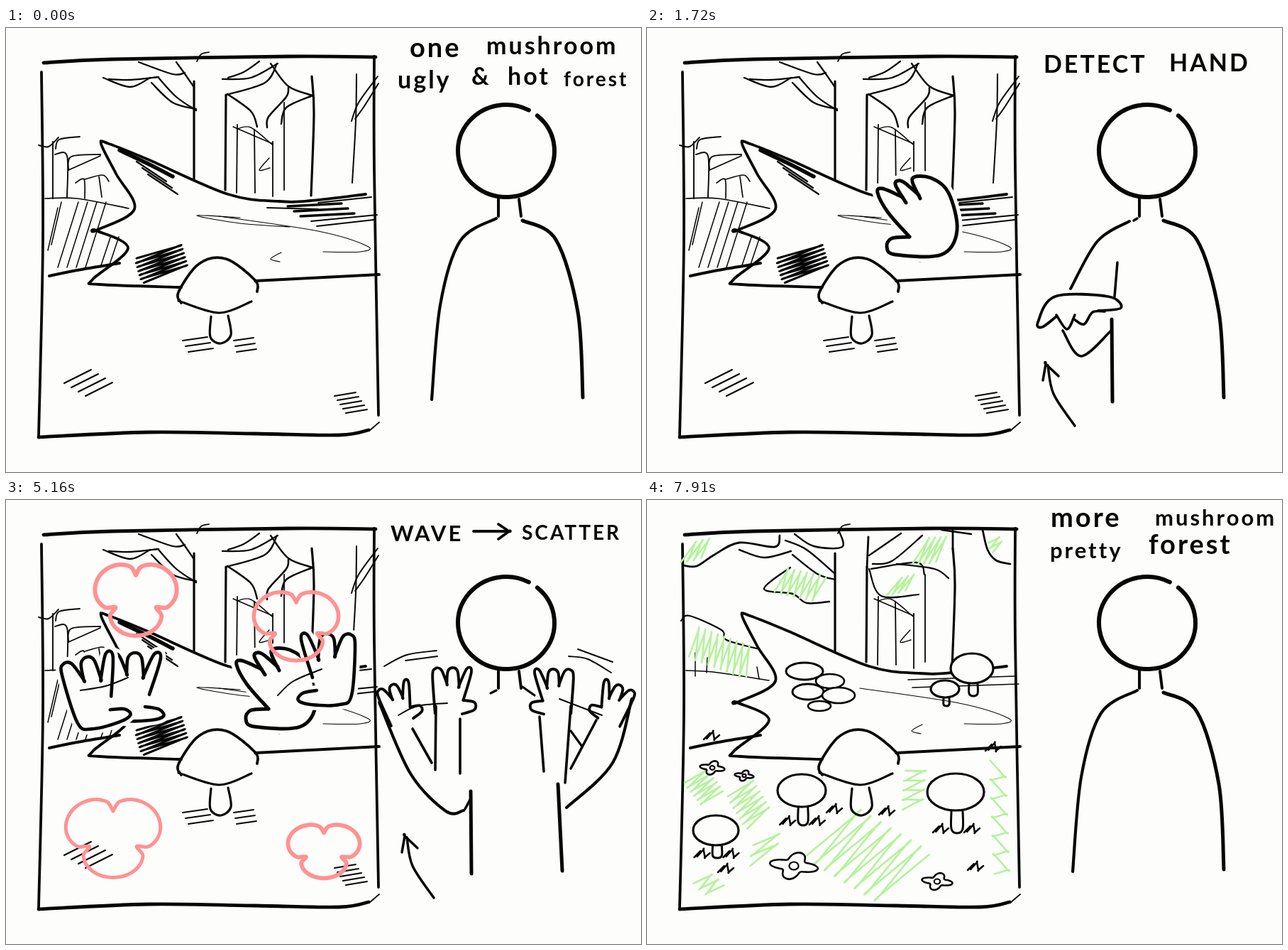
Recreate the animation shown at these times as an HTML page with a canvas. Size 895 by 625 pixels, loop 8.6 s.

```html
<!DOCTYPE html>
<html lang="en">
<head>
<meta charset="utf-8">
<title>Mushroom storyboard</title>
<style>
html, body { margin: 0; width: 100%; height: 100%; overflow: hidden; background: #fdfdfc; }
canvas { display: block; }
</style>
</head>
<body>
<canvas width="895" height="625" role="img" aria-label="Hand-drawn storyboard of a mushroom forest"></canvas>
<script>
const PAPER = '#fdfdfc', INK = '#060606', PINK = '#ff9292', GREEN = '#b5f29c';
const HOLD = 1720;
const canvas = document.querySelector('canvas');
const g = canvas.getContext('2d');
g.lineCap = g.lineJoin = 'round';

// Maps local points to a place, scale and tilt on the stage.
function at(x, y, sx = 1, sy = sx, deg = 0) {
  const a = deg * Math.PI / 180, c = Math.cos(a), s = Math.sin(a);
  return (u, v) => [x + u * sx * c - v * sy * s, y + u * sx * s + v * sy * c];
}

// Smooth curve through the points; a repeated point makes a corner.
function curve(text, place = at(0, 0)) {
  const n = text.trim().split(/\s+/).map(Number), p = [];
  for (let i = 0; i < n.length; i += 2) p.push(place(n[i], n[i + 1]));
  const path = new Path2D();
  path.moveTo(...p[0]);
  for (let i = 0; i < p.length - 1; i++) {
    const b = p[i], c = p[i + 1], a = p[i - 1] || b, d = p[i + 2] || c;
    path.bezierCurveTo(b[0] + (c[0] - a[0]) / 6, b[1] + (c[1] - a[1]) / 6,
      c[0] - (d[0] - b[0]) / 6, c[1] - (d[1] - b[1]) / 6, ...c);
  }
  return path;
}

// Strokes are separated by "/".
function ink(width, strokes, place, hue = INK) {
  g.strokeStyle = hue;
  g.lineWidth = width;
  for (const s of strokes.split('/')) g.stroke(curve(s, place));
}

// Covers what lies behind, with a thin margin, before inking.
function solid(width, strokes, place) {
  const shape = curve(strokes.replaceAll('/', ' '), place);
  g.fillStyle = g.strokeStyle = PAPER;
  g.lineWidth = width + 10;
  g.fill(shape);
  g.stroke(shape);
  ink(width, strokes, place);
}

function hatch(width, x, y, dx, dy, stepX, stepY, n) {
  for (let i = 0; i < n; i++) ink(width, `0 0 ${dx} ${dy}`, at(x + i * stepX, y + i * stepY));
}

function zigzag(x, y, dx, dy, ox, oy, n, width = 2.6, hue = GREEN) {
  let s = '';
  for (let i = 0; i <= n; i++) {
    const side = i % 2 ? 1 : -1;
    s += ` ${i / n * dx + side * ox} ${i / n * dy + side * oy}`.repeat(2);
  }
  ink(width, s, at(x, y), hue);
}

function oval(x, y, rx, ry, width) {
  g.beginPath();
  g.ellipse(x, y, rx, ry, 0, 0, 7);
  g.fillStyle = PAPER;
  g.fill();
  g.strokeStyle = INK;
  g.lineWidth = width;
  g.stroke();
}

// Radial outline; radius(a) runs over one turn from the top.
function blob(width, x, y, rx, ry, radius, hue) {
  let s = '';
  for (let i = 0; i <= 48; i++) {
    const a = i * Math.PI / 24, r = radius(a);
    s += ` ${r * Math.sin(a)} ${-r * Math.cos(a)}`;
  }
  ink(width, s, at(x, y, rx, ry), hue);
}

const cloud = (width, x, y, rx, ry) =>
  blob(width, x, y, rx, ry, a => 0.58 + 0.48 * Math.sqrt(Math.abs(Math.sin(1.5 * a))), PINK);

function write(text, x, y, size = 34) {
  g.font = `bold ${size}px Lato, sans-serif`;
  g.letterSpacing = '3px';
  g.fillStyle = INK;
  g.fillText(text, x, y);
}

function frame() {
  ink(4.8, '53 49 150 44 400 40 521 41/46 576 200 569 350 571 470 573 511 566');
  ink(3.8, '50 62 52 300 46 575/519 40 519 200 525 545');
  ink(1.8, '512 567 526 555/269 47 275 37 286 34');
}

function log() {
  ink(3.8, '507 234 430 243 385 244 313 234 200 185 145 163 134 163 155 205 181 255 127 285 127 285 172 310 122 354 132 361 247 365');
  ink(4, '61 349 100 341 160 331/351 356 526 347');
  ink(1.1, '300 265 440 286 509 307 500 315 447 315/388 316 373 325 386 329');
}

function mushroom() {
  ink(3.8, '247 387 243 372 272 332 310 325 351 355 354 371');
  ink(3.2, '243 384 300 401 346 385/289 406 288 435 303 444 317 432 313 405');
}

function trunks() {
  ink(3.2, '265 75 265 213/310 94 309 228/431 68 434 120 430 236');
  ink(1.8, '326 136 325 232/350 143 351 232/376 160 376 237/392 105 392 228');
  ink(1.4, '320 139 376 163/326 142 345 140 375 164/371 183 357 200 372 197');
}

function bareWoods() {
  trunks();
  ink(2.3, '137 70 175 83 203 70/145 72 175 73 215 69/215 70 240 97 268 116/205 77 235 105 268 114');
  ink(2.3, '187 48 235 65 252 63/240 48 253 66 264 82/313 70 335 62 357 47/305 72 345 70 383 50/311 94 365 77 382 50');
  ink(2.5, '312 93 345 117 354 139/373 50 398 82 432 95/398 84 395 97 370 125 368 140/432 95 395 112 388 135');
  ink(2, '494 65 493 130 488 218/524 68 497 105 487 131/525 78 505 110 492 128');
  ink(1.9, '46 165 60 167 74 154/66 160 66 240/70 170 75 157 104 153/69 178 86 180 86 238/88 200 92 181 133 178/88 200 133 180');
  ink(1.7, '98 218 110 213 111 240/111 213 136 207 145 216/131 209 135 238/55 240 100 240 173 254');
  hatch(1.5, 78, 245, -14, 60, -5, 8, 2);
  hatch(1.5, 102, 245, -29, 92, 13, 0, 4);
  hatch(1.5, 148, 292, -14, 42, 11, 2, 2);
}

function shading() {
  ink(5.5, '160 172 200 191 235 209');
  hatch(2.2, 184, 188, 42, 28, 8, 9, 3);
  zigzag(214, 314, 10, 34, 26, -9, 12, 3, INK);
  hatch(3.3, 397, 251, 76, -4, 9, 7, 3);
  ink(1.8, '368 253 440 255/440 246 515 238/430 272 523 263/438 279 518 270');
  ink(1.2, '330 267 269 264 330 275 400 280');
  hatch(1.8, 249, 440, 35, -5, 4, 8, 3);
  hatch(1.8, 321, 440, 28, -4, 2, 8, 3);
  hatch(2.1, 82, 500, 38, -19, 10, 6, 4);
  hatch(2.1, 463, 518, 30, -5, 4, 6, 5);
}

function head() {
  g.beginPath();
  g.ellipse(705, 173, 68, 65, 0, -0.87, 5.2);
  g.strokeStyle = INK;
  g.lineWidth = 6;
  g.stroke();
  ink(4, '694 241 694 265/723 241 726 265');
}

const rightSide = () => ink(5, '728 271 775 298 806 400 813 520');

function body() {
  head();
  rightSide();
  ink(4.2, '691 268 640 300 612 390 600 523');
}

function scene() {
  frame();
  bareWoods();
  log();
  shading();
  mushroom();
}

const reach = (width, place) => solid(width,
  '370 294 345 296 338 308 350 319 415 319 437 285 425 232 400 211 374 212 385 240/383 235 360 216 350 220 365 246/360 238 332 226 325 232 340 260 370 294', place);

// Upright hand, thumb on the left, origin at the wrist.
const FINGERS = '-20 -38 -36 -92 -27 -98 -12 -66 -12 -66 -9 -93 0 -100 10 -93 12 -70 12 -70 23 -96 35 -98 40 -83 35 -13';
const palm = place => solid(4.6, FINGERS + ' 18 0 -22 0 -40 -6 -34 -16 -14 -20', place);
const raised = place => ink(3.9, FINGERS + '/-20 -38 -42 -34 -42 -20 -18 -12', place);

const arrowUp = () => ink(3.5, '603 560 573 515 565 475/558 496 562 473 562 473 580 490');
const arrowRight = (x, y) => ink(3.8, '0 0 50 0/35 -10 50 0 50 0 35 11', at(x, y));

function lowArm() {
  head();
  rightSide();
  ink(3.5, '691 268 686 271/663 330 659 378');
  ink(5, '655 410 656 526');
  ink(3.8, '577 406 557 421 551 414 575 378 650 378 668 394 636 398');
  ink(3.6, '577 404 592 424 603 404/602 410 616 417 628 400 645 399/586 426 612 462 655 425');
}

function start() {
  scene();
  body();
  write('one', 569, 41, 38);
  write('mushroom', 677, 37);
  write('ugly', 552, 85);
  write('&', 656, 80);
  write('hot', 707, 80);
  write('forest', 786, 82, 28);
}

function detect() {
  scene();
  reach(5);
  lowArm();
  ink(4, '680 272 635 300 597 367');
  arrowUp();
  write('DETECT', 559, 63);
  write('HAND', 736, 61);
}

function pat() {
  scene();
  reach(5);
  reach(4.5, at(-57, 182, 0.94, 0.6));
  lowArm();
  ink(4, '680 272 660 278 636 303');
  solid(4, FINGERS + ' 18 0 -22 0 -50 -14 -34 -24 -14 -26', at(632, 351, -0.92, 0.92, -44));
  ink(2, '303 343 330 290 382 258/316 322 352 280');
  ink(2.4, '603 323 600 372/660 348 659 378/541 335 538 355 542 385/550 338 546 360 549 381/696 343 700 365 695 387/687 346 690 362 687 385');
  cloud(4.5, 212, 336, 26, 23);
  cloud(4.5, 414, 341, 29, 19);
  cloud(5, 222, 424, 34, 34);
  cloud(5.5, 404, 409, 45, 34);
  write('PAT', 550, 64);
  arrowRight(645, 47);
  write('SPORES', 726, 57, 32);
}

function waveArms() {
  head();
  ink(3.2, '691 268 683 272/728 263 745 275/796 325 812 347');
  raised(at(566, 318, -0.62, 0.62, -20));
  raised(at(630, 310, -0.72, 0.74));
  raised(at(771, 310, 0.72));
  raised(at(842, 318, 0.62, 0.62, 22));
  ink(4.2, '526 285 570 385 620 438 645 437/882 280 855 370 790 433');
  ink(3.6, '573 322 600 370/647 435 655 420/832 310 796 378/606 290 605 380/640 308 640 385/752 305 758 382/796 290 788 398');
  ink(5, '655 410 656 526/778 400 784 522');
  ink(1.9, '533 234 565 218 607 212/563 226 608 220/793 220 820 224 853 243/806 210 855 228/553 303 580 290 622 286/780 280 840 303');
  arrowUp();
}

function wave() {
  scene();
  palm(at(182, 310, -1, 0.95));
  palm(at(138, 318, -1, 1, -14));
  reach(5);
  palm(at(452, 288));
  ink(2, '105 268 140 262 172 250/383 275 405 255 445 238');
  waveArms();
  cloud(6, 183, 136, 57, 52);
  cloud(5.5, 409, 173, 59, 50);
  cloud(5, 151, 471, 66, 57);
  cloud(5.8, 448, 491, 50, 39);
  write('WAVE', 542, 58, 31);
  arrowRight(659, 44);
  write('SCATTER', 727, 56, 28);
}

function tuft(x, y) {
  ink(2.5, '-10 0 -2 -8 -2 -8 -5 -2 -5 -2 3 -11 3 -11 5 0 5 0 12 -6', at(x, y));
}

function toadstool(x, y, rx, ry, stem, grassy) {
  oval(x, y, rx, ry, 3.2);
  ink(3, '-1 0 -1 .8 0 1 1 .8 1 0', at(x + 2, y + ry + 1, rx * 0.2, stem));
  if (grassy) for (const side of [-1, 1]) tuft(x + side * (rx * 0.2 + 14), y + ry + stem);
}

function flower(x, y, r) {
  blob(2.6, x, y, r, r * 0.55, a => 0.8 + 0.25 * Math.cos(4 * a - 1));
  oval(x, y, r / 5, r / 6, 2.2);
}

function lushWoods() {
  trunks();
  ink(2.8, '431 42 431 68/312 52 310 94/51 92 70 93 95 77 130 60 180 66 187 50/473 42 480 70 492 85 512 90');
  ink(2.4, '130 70 165 81 203 72/205 77 240 104 265 112/195 57 225 70 265 104');
  ink(2.4, '202 95 165 125 205 132 225 145 257 143/208 48 235 65 275 66 270 42');
  ink(2.3, '358 47 313 78/388 50 345 86 318 90/316 97 380 88 391 105/352 90 405 97 425 110/415 42 457 48');
  ink(2.2, '313 97 330 135 383 133/48 170 60 163 105 183 112 197 158 210');
  ink(1.5, '55 240 100 243 172 254/68 215 68 248/85 222 84 243/155 235 158 252');
}

function greenery() {
  zigzag(56, 74, 28, -6, 7, -12, 6);
  zigzag(187, 113, 58, 12, 6, -14, 13);
  zigzag(64, 200, 80, 29, 4, -18, 18);
  zigzag(384, 72, 32, -2, 8, -15, 8);
  zigzag(346, 123, 26, -7, 7, -10, 6);
  zigzag(488, 55, 6, 13, 6, -5, 4);
  zigzag(67, 388, 26, 32, 12, -9, 11);
  zigzag(130, 405, 27, 45, 14, -11, 12);
  zigzag(168, 475, -4, 28, 16, -10, 4);
  zigzag(258, 468, 106, 64, 29, -29, 15);
  zigzag(378, 378, -4, 54, 12, -3, 8);
  zigzag(494, 372, 6, 158, 9, 4, 12);
  zigzag(76, 532, 22, 18, 9, -7, 5);
}

function finish() {
  frame();
  lushWoods();
  greenery();
  log();
  mushroom();
  oval(222, 241, 26, 12, 3);
  oval(227, 270, 22, 11, 3);
  oval(243, 290, 16, 7, 2.6);
  oval(258, 255, 20, 10, 2.6);
  oval(270, 275, 23, 11, 2.6);
  hatch(1.6, 368, 253, 150, -5, 6, 11, 2);
  toadstool(458, 237, 30, 21, 17);
  toadstool(420, 266, 20, 12, 11);
  toadstool(218, 409, 34, 23, 25, true);
  toadstool(435, 411, 40, 26, 31, true);
  toadstool(97, 465, 32, 21, 17, true);
  flower(92, 377, 17);
  flower(137, 388, 13);
  flower(207, 515, 33);
  flower(409, 537, 21);
  tuft(263, 440);
  tuft(337, 443);
  tuft(90, 337);
  tuft(487, 353);
  tuft(110, 524);
  tuft(462, 521);
  body();
  write('more', 569, 38, 38);
  write('mushroom', 716, 36, 31);
  write('pretty', 568, 82, 31);
  write('forest', 707, 76, 38);
}

const scenes = [start, detect, pat, wave, finish];
const began = performance.now();
let shown = -1;

function tick() {
  const now = Math.floor((performance.now() - began) / HOLD) % scenes.length;
  if (now !== shown) {
    shown = now;
    g.fillStyle = PAPER;
    g.fillRect(0, 0, 895, 625);
    scenes[now]();
  }
  requestAnimationFrame(tick);
}
tick();
</script>
</body>
</html>
```
